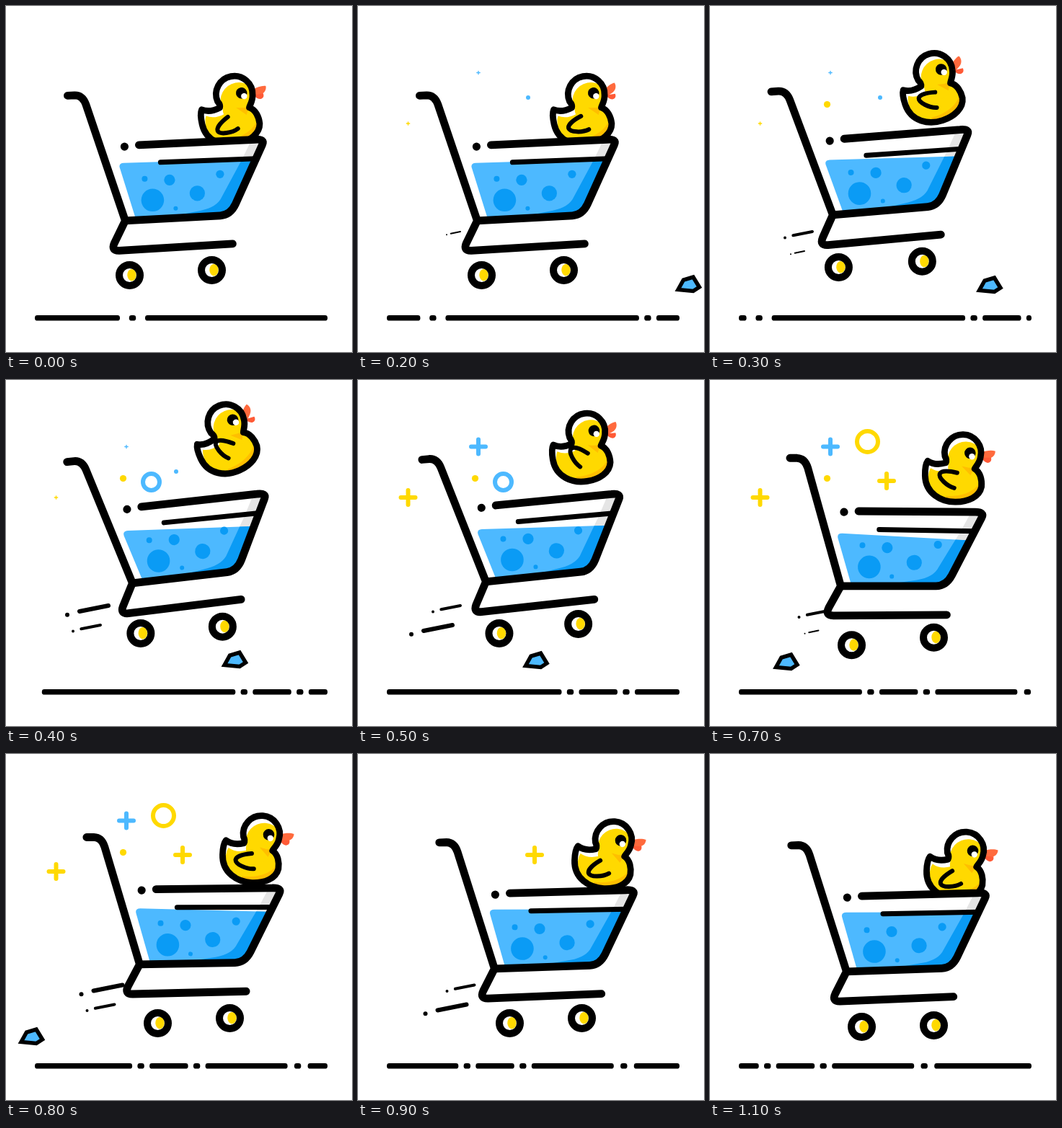
Write an HTML page that moves like this. It is 480 by 480 pixels and loops after 1200 ms.

```html
<!DOCTYPE html>
<html lang="en">
<head>
<meta charset="utf-8">
<title>Duck in a cart</title>
<style>
  html, body { margin: 0; width: 100%; height: 100%; overflow: hidden; background: #fff; }
  svg { display: block; width: 100vw; height: 100vh; }
  .line { fill: none; stroke: #000; stroke-linecap: round; stroke-linejoin: round; }
</style>
</head>
<body>
<svg viewBox="0 0 480 480">
  <defs>
    <path id="basket" d="M184 193 L345 185.5 Q359 184.5 355 193 L318 275 Q311 290 297 291 L165 298"/>
    <path id="band" d="M341 184 L327 213 L299 265 Q293 279 270 284 L220 294 V302 H345 L365 184Z"/>
    <path id="body" d="M-49 10 Q-39 17 -24 13 Q-22 9 -25 4 A25.3 25.3 0 1 1 24.3 6 C23 14 18 18 16 22 C24 27 26 38 25 47 C22 61 6 67.5 -11 67.5 C-31 67.5 -53 55 -53 30 C-53 22 -52 14 -49 10Z"/>
    <clipPath id="inBasket"><path d="M130 193 L345 185.5 Q359 184.5 355 193 L318 275 Q311 290 297 291 L165 298Z"/></clipPath>
    <clipPath id="inWater"><path class="water"/></clipPath>
    <clipPath id="inBody"><use href="#body"/></clipPath>
    <g id="wheel">
      <circle r="14.5" fill="#fff"/>
      <ellipse cx="3" cy="-.3" rx="6.2" ry="8.3" fill="#ffd900"/>
      <circle r="14.5" class="line" stroke-width="10"/>
    </g>
    <path id="plus" d="M-10 0H10M0 -10V10" fill="none" stroke-width="6" stroke-linecap="round"/>
  </defs>

  <g id="ground"></g>
  <path id="rock" d="M-15 7.5 L-7.5 -6 L6 -10 L14.5 4 L6 9.5Z" fill="#4db9ff" stroke="#000" stroke-width="5.5"/>
  <g id="sparks"></g>

  <g id="duck">
    <path id="upper" d="M25 -1 C33 -3 40 -4 45 -2 C45 3 41 8 34 8 L26 8Z" fill="#ff6a3d"/>
    <path id="lower" d="M26 7 L39 7 C40 11 38 14 34 14 C30 13 28 11 26 7Z" fill="#ff5a36"/>
    <use href="#body" fill="#fff"/>
    <g clip-path="url(#inBody)" fill="#ffd900">
      <use href="#body" x="4" y="10"/>
      <circle cx="-2" cy="20" r="19"/>
      <path d="M-25 59 C0 61 20 52 27 34 L40 70 L-25 80Z M-2 18 Q8 21 17 21 Q12 26 10 31Z" fill="#ffbf00"/>
    </g>
    <use href="#body" class="line" stroke-width="8.8"/>
    <circle cx="10" cy="0" r="7.8"/>
    <circle cx="12.5" cy="5" r="4.2" fill="#fff"/>
    <path id="wing" class="line" stroke-width="6" d="M-16 28 C-27 33 -35 39 -34 44 C-32 50 -15 51 -6 47"/>
  </g>

  <g id="cart">
    <use href="#basket" fill="#fff"/>
    <g clip-path="url(#inBasket)">
      <use href="#band" fill="#e5e5e5"/>
      <path class="water" fill="#4db9ff"/>
      <use href="#band" fill="#0a9bf5" clip-path="url(#inWater)"/>
    </g>
    <g fill="#0a9bf5">
      <circle cx="203" cy="269.5" r="15.8"/>
      <circle cx="226.5" cy="241.5" r="7.6"/>
      <circle cx="192" cy="240" r="4"/>
      <circle cx="265" cy="260" r="10.6"/>
      <circle cx="296.5" cy="233.5" r="5.6"/>
      <circle cx="235" cy="281" r="3"/>
    </g>
    <path class="line" stroke-width="7" d="M214 217 L347 212"/>
    <g class="line" stroke-width="10.8">
      <use href="#basket"/>
      <path d="M85 124.5 L95 124 Q106 124 110.5 137 L165 298 L150 329 Q145 340 157 339.5 L314 330"/>
    </g>
    <circle cx="164" cy="195.3" r="5.6"/>
  </g>
  <use id="rear" href="#wheel"/>
  <use id="front" href="#wheel"/>
  <g id="streaks"></g>
</svg>
<script>
const LOOP = 1200, STEP = 100;
const BLUE = '#4db9ff', YELLOW = '#ffd900';
const $ = id => document.getElementById(id);
const put = (el, attrs) => { for (const k in attrs) el.setAttribute(k, attrs[k]); return el; };
const add = (parent, tag, attrs) =>
  parent.appendChild(put(document.createElementNS('http://www.w3.org/2000/svg', tag), attrs));
const move = (id, x, y, rest = '') => put($(id), { transform: `translate(${x} ${y}) ${rest}` });
const show = (el, on) => put(el, { visibility: on ? 'visible' : 'hidden' });

// 0 to 1 between two times, bent by a power
const ramp = (t, from, to, power = 1) =>
  Math.min(1, Math.max(0, (t - from) / (to - from))) ** power;
// goes up, stays, comes down again
const lift = (t, top, landed, rise = 200, fall = 600) => ramp(t, rise, top) - ramp(t, fall, landed);
const hop = (t, from, to) => Math.sin(Math.PI * ramp(t, from, to));

const sparks = [
  { kind: 'plus', color: BLUE, x: 167, y: 92.5, from: 200, until: 900 },
  { kind: 'plus', color: YELLOW, x: 69.5, y: 163, from: 200, until: 900 },
  { kind: 'plus', color: YELLOW, x: 245, y: 140, from: 700, until: 1000 },
  { kind: 'dot', color: BLUE, x: 236, y: 127, r: 3, from: 200, until: 500 },
  { kind: 'dot', color: YELLOW, x: 162.5, y: 136.5, r: 4.6, from: 300, until: 900 },
  { kind: 'ring', color: BLUE, x: 201.5, y: 141.5, r: 11.5, from: 400, until: 600 },
  { kind: 'ring', color: YELLOW, x: 218.5, y: 85.5, r: 14.5, from: 600, until: 900 }
];
for (const s of sparks) {
  const paint = s.kind === 'dot' ? { fill: s.color } : { fill: 'none', stroke: s.color, 'stroke-width': 6 };
  s.el = s.kind === 'plus'
    ? add($('sparks'), 'use', { href: '#plus', stroke: s.color })
    : add($('sparks'), 'circle', { r: s.r, ...paint });
}

// two pairs of speed lines; the second pair follows 400 ms later
const streaks = [0, 1, 2, 3].map(i => {
  const pair = i >> 1, low = i % 2;
  const el = add($('streaks'), 'g', {});
  add(el, 'path', { class: 'line', 'stroke-width': 6, d: 'M-40 8 L0 0' });
  add(el, 'circle', { cx: -57, cy: 12.8, r: 3 });
  return { el, x: 142 + 19.5 * pair - 11 * low, y: 313 + 7.5 * pair + 27 * low, from: 200 + 400 * pair + 100 * low };
});

function bar(from, to) {
  const x = Math.max(40, from), end = Math.min(446, to);
  if (end - x > 2) add($('ground'), 'rect', { x, y: 429, width: end - x, height: 7.6, rx: 3.4 });
}

function drawGround(t) {
  $('ground').replaceChildren();
  let start = -100;
  for (const [x0, gap] of [[175.5, 17.5], [473.5, 12], [551, 12], [691, 14]]) {
    const x = x0 - t * .358;
    bar(start, x - gap);
    bar(x - 4.7, x + 4.7);
    start = x + gap;
  }
  bar(start, 900);
}

function drawCart(t) {
  const settle = ramp(t, 900, 1100);
  const x = 165.4 + 10 * ramp(t, 200, 400) + 6 * ramp(t, 400, 700) + 8 * ramp(t, 700, 900);
  const y = 297.8 - 18 * lift(t, 425, 900) + 4 * settle;
  const tilt = -3.6 * ramp(t, 200, 400) + 6.7 * ramp(t, 400, 700, 2) - 2 * ramp(t, 700, 900);
  move('cart', x, y, `rotate(${tilt}) translate(-165 -298)`);

  const slosh = lift(t, 400, 900, 200, 700);
  const left = 218 + 7 * slosh - 2 * ramp(t, 700, 900);
  const right = 212 + 13.5 * slosh + 5.5 * hop(t, 200, 600);
  const d = `M181 300 L157.5 ${left + 7} Q155.5 ${left + .3} 163 ${left} L365 ${right - .4} V300Z`;
  document.querySelectorAll('.water').forEach(el => put(el, { d }));

  move('rear', 171.5 + 39 * ramp(t, 200, 650, 1.15) - 14 * hop(t, 600, 800),
    373.5 - 22 * lift(t, 400, 735) + 5 * settle);
  move('front', 285.5 + 25 * ramp(t, 200, 600, .75), 366.5 - 28 * lift(t, 430, 750) + 10 * settle);
}

function drawDuck(t) {
  const jump = ramp(t, 200, 400);
  const x = 317 - 11.5 * jump + 49 * ramp(t, 400, 720, 1.2);
  const y = 123 - 63.5 * jump + 42 * ramp(t, 400, 700, 1.1) + 32.5 * ramp(t, 700, 1100, .85);
  const wing = 10 * ramp(t, 0, 200) + 61 * jump - 79 * ramp(t, 400, 900, 1.8);
  const beak = 40 * lift(t, 400, 600, 0, 400);
  move('duck', x, y, `rotate(${-13 - 12 * jump + 27 * ramp(t, 400, 800, .4)})`);
  put($('wing'), { transform: `rotate(${wing} -11 38)` });
  put($('upper'), { transform: `rotate(${-beak} 28 5)` });
  put($('lower'), { transform: `rotate(${beak * .2} 28 7)` });
}

function draw(t) {
  drawGround(t);
  drawCart(t);
  drawDuck(t);
  move('rock', 600 - .705 * t, 384 + .01 * t);

  for (const s of sparks) {
    const size = s.kind === 'plus' && t < 500 ? .22 : 1;
    put(s.el, { transform: `translate(${s.x} ${s.y}) scale(${size})` });
    show(s.el, t >= s.from && t < s.until);
  }
  for (const s of streaks) {
    const age = (t - s.from) / STEP;
    const size = 1 - Math.abs(age - 2) / 3;
    put(s.el, { transform: `translate(${s.x} ${s.y}) scale(${size})` });
    show(s.el, age >= 0 && age < 4);
  }
}

const begin = performance.now();
function tick() {
  const t = (performance.now() - begin) % LOOP;
  draw(Math.floor(t / STEP) * STEP);
  requestAnimationFrame(tick);
}
tick();
</script>
</body>
</html>
```
